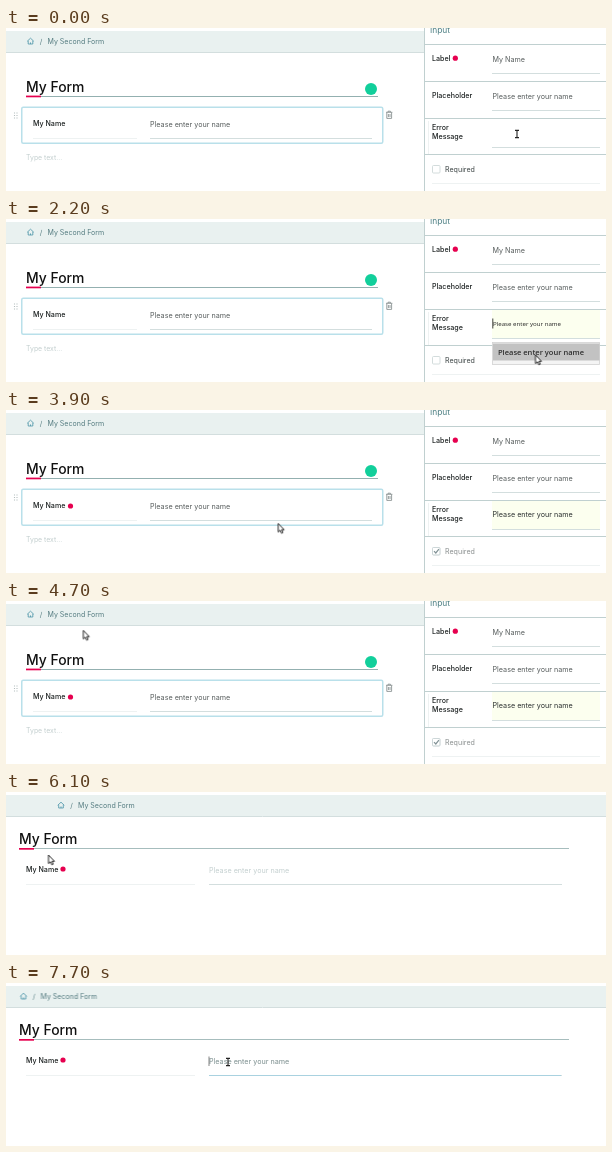
An HTML page for the animation above (8 s loop, 600x163 px).

```html
<!DOCTYPE html>
<html lang="en">
<head>
<meta charset="utf-8">
<title>Form builder</title>
<style>
html, body { margin: 0; width: 100%; height: 100%; overflow: hidden; background: #fff; }
svg { display: block; width: 100vw; height: 100vh; }
text { font: 7.2px Inter, "Open Sans", sans-serif; fill: #565c5c; }
.b { font-weight: 550; font-size: 7.1px; fill: #1a1f1f; }
.title { font-weight: 500; font-size: 13.9px; fill: #111; }
.crumb { font-size: 7.05px; fill: #557c80; }
.ghost { fill: #c3cfcf; }
.sys { font-family: "Open Sans", "Noto Sans", sans-serif; }
.pink { fill: #e6004f; }
.rule { stroke: #d3dede; }
.faint { stroke: #eef2f2; }
.split { stroke: #c0d0d0; }
line { stroke-width: 1; }

/* 1.25% is 100 ms */
.t { animation: 8s step-end infinite; }
.builder { animation-name: builder; }
.preview { animation-name: preview; }
.caret-a { animation-name: caretA; }
.drop { animation-name: drop; }
.hover { animation-name: hover; }
.tint { animation-name: tint; }
.value { animation-name: value; }
.caret-b { animation-name: caretB; }
.checked { animation-name: checked; }
.star { animation-name: star; }
.focus { animation-name: focus; }
.beam { animation-name: beam; }
.arrow { animation-name: arrow; }
.hand { animation-name: hand; }
.lock { animation: lock 8s linear infinite; }
.slide { animation: slide 8s linear infinite; }
.cursor { animation: move 8s linear infinite; }

@keyframes builder { 0% { opacity: 1 } 76.25%, 100% { opacity: 0 } }
@keyframes preview { 0% { opacity: 0 } 76.25%, 100% { opacity: 1 } }
@keyframes caretA { 0% { opacity: 0 } 2.5% { opacity: 1 } 31.25%, 100% { opacity: 0 } }
@keyframes drop { 0% { opacity: 0 } 7.5% { opacity: 1 } 31.25%, 100% { opacity: 0 } }
@keyframes hover { 0% { opacity: 0 } 18.75% { opacity: 1 } 31.25%, 100% { opacity: 0 } }
@keyframes tint { 0% { opacity: 0 } 18.75%, 100% { opacity: 1 } }
@keyframes value { 0% { opacity: 0 } 31.25%, 100% { opacity: 1 } }
@keyframes caretB { 0% { opacity: 0 } 31.25% { opacity: 1 } 38.75%, 100% { opacity: 0 } }
@keyframes checked { 0% { opacity: 0 } 38.75%, 100% { opacity: 1 } }
@keyframes star { 0% { opacity: 0 } 46.25%, 100% { opacity: 1 } }
@keyframes focus { 0% { opacity: 0 } 95%, 100% { opacity: 1 } }
@keyframes beam { 0% { opacity: 1 } 12.5% { opacity: 0 } 86.25%, 100% { opacity: 1 } }
@keyframes arrow {
  0% { opacity: 0 } 12.5% { opacity: 1 } 33.75% { opacity: 0 } 46.25% { opacity: 1 }
  62.5% { opacity: 0 } 76.25% { opacity: 1 } 86.25%, 100% { opacity: 0 }
}
@keyframes hand { 0% { opacity: 0 } 33.75% { opacity: 1 } 46.25%, 100% { opacity: 0 } }
@keyframes lock { 0%, 46.25% { opacity: 1 } 48.75%, 68.75% { opacity: .6 } 72.5%, 100% { opacity: 1 } }
@keyframes slide {
  0%, 78.75% { transform: translate(30.5px, 0) }
  83.75%, 100% { transform: translate(-7px, 0) }
}
@keyframes move {
  0%, 12.5% { transform: translate(511px, 106px) }
  18.75% { transform: translate(518px, 125px) }
  23.75%, 31.25% { transform: translate(529.5px, 136px) }
  35%, 45% { transform: translate(444px, 140px) }
  46.25% { transform: translate(436px, 135px) }
  51.25%, 52.5% { transform: translate(110px, 92px) }
  53.75% { transform: translate(92px, 84px) }
  56.25%, 57.5% { transform: translate(78px, 48px) }
  58.75% { transform: translate(77.5px, 29.5px) }
  62.4% { transform: translate(5px, -14px) }
  62.5%, 78.75% { transform: translate(42.5px, 63px) }
  85% { transform: translate(203px, 74px) }
  87.5%, 90% { transform: translate(221px, 79px) }
  91.25%, 100% { transform: translate(222px, 79px) }
}
</style>
</head>
<body>
<svg viewBox="0 0 600 163" xmlns="http://www.w3.org/2000/svg">
  <defs>
    <g id="crumbs">
      <path d="M21.2 13.3 24.5 10.2 27.8 13.3M22.2 12.8V16H26.8V12.8M24.5 16V14.4" fill="none" stroke="#4a93a8" stroke-width=".8"/>
      <text class="crumb" x="33.8" y="16.3">/</text>
      <text class="crumb" x="41.5" y="16.3">My Second Form</text>
    </g>
  </defs>
  <rect width="600" height="163" fill="#fff"/>

  <g class="t builder">
    <rect y="3" width="418" height="21" fill="#e9f1f0"/>
    <line class="rule" x1="0" y1="24.5" x2="418" y2="24.5"/>
    <use href="#crumbs"/>

    <text class="title" x="20" y="64">My Form</text>
    <line x1="20" y1="68.5" x2="372" y2="68.5" stroke="#93b0b0"/>
    <rect class="pink" x="20" y="67.6" width="15" height="1.7"/>
    <circle cx="365" cy="61" r="6" fill="#12cf9b"/>

    <path d="M8.5 84.5v6.5M11 84.5v6.5" stroke="#b4bdbd" stroke-width="1.1" stroke-dasharray="1.1 1.4"/>
    <rect x="15.75" y="79.25" width="361" height="36" rx="1.5" fill="#fff" stroke="#b9e0ea" stroke-width="1.5"/>
    <text class="b" x="27" y="98.4">My Name</text>
    <circle class="pink t star" cx="64.5" cy="96" r="2.6"/>
    <text x="144" y="99.3">Please enter your name</text>
    <line class="faint" x1="27" y1="110.5" x2="131" y2="110.5"/>
    <line class="rule" x1="144" y1="110.5" x2="366" y2="110.5"/>
    <path d="M380 84.3h6.4M382 84.2v-1h2.4v1M380.8 84.6v5.8h4.8v-5.8M382.4 86v3M384 86v3" fill="none" stroke="#7d8686" stroke-width=".8"/>
    <text class="ghost" x="20" y="132.4" style="font-size:6.9px">Type text...</text>

    <rect x="418" width="182" height="163" fill="#fff"/>
    <line class="split" x1="418.5" y1="0" x2="418.5" y2="163"/>
    <text x="424" y="5" style="font-size:8.4px;fill:#4a7d80">Input</text>
    <path class="split" d="M419 16.5H600M419 53.5H600M419 90.5H600M419 126.5H600"/>
    <path class="faint" d="M422.5 93V126M426 155.5H594"/>

    <text class="b" x="426" y="32.8">Label</text>
    <circle class="pink" cx="449.3" cy="30.2" r="2.6"/>
    <text x="486.5" y="33.8">My Name</text>
    <line class="rule" x1="486" y1="45.5" x2="594" y2="45.5"/>

    <text class="b" x="426" y="69.8">Placeholder</text>
    <text x="486.5" y="70.6">Please enter your name</text>
    <line class="rule" x1="486" y1="82.5" x2="594" y2="82.5"/>

    <text class="b" x="426" y="102">Error</text>
    <text class="b" x="426" y="110.6">Message</text>
    <rect class="t tint" x="486" y="91" width="108" height="28" fill="#fcffef"/>
    <line class="rule" x1="486" y1="119.5" x2="594" y2="119.5"/>
    <text class="sys t hover" x="487" y="106.8" style="font-size:6.15px;fill:#222">Please enter your name</text>
    <text class="t value" x="486.5" y="107.2" style="fill:#2b3030">Please enter your name</text>
    <line class="t caret-a" x1="486.8" y1="99.5" x2="486.8" y2="109.5" stroke="#111" style="stroke-width:.8"/>
    <line class="t caret-b" x1="567.5" y1="99.5" x2="567.5" y2="109.5" stroke="#111" style="stroke-width:.8"/>

    <g class="lock">
      <rect x="426.5" y="137.5" width="7.5" height="7.5" rx="1" fill="#fff" stroke="#cfd9d9" stroke-width=".9"/>
      <g class="t checked">
        <rect x="426.5" y="137.5" width="7.5" height="7.5" rx="1" fill="none" stroke="#a9b9bb" stroke-width=".9"/>
        <path d="M428 141.2 429.8 143 432.9 139.2" fill="none" stroke="#2f4a50" stroke-width="1.2"/>
      </g>
      <text x="439" y="143.8" style="font-size:7.1px;fill:#3d4545">Required</text>
    </g>

    <g class="t drop">
      <rect x="486.5" y="123.5" width="107" height="22" fill="#f4f4f4" stroke="#d2d2d2" stroke-width=".8"/>
      <rect class="t hover" x="487" y="124.5" width="106.5" height="17" fill="#c2c2c2"/>
      <text class="sys" x="492" y="135.7" style="font-size:7.5px;font-weight:600;fill:#2e2e2e">Please enter your name</text>
    </g>
  </g>

  <g class="t preview">
    <rect width="600" height="163" fill="#fff"/>
    <rect y="3" width="600" height="21" fill="#e9f1f0"/>
    <line class="rule" x1="0" y1="24.5" x2="600" y2="24.5"/>
    <g class="slide"><use href="#crumbs"/></g>

    <text class="title" x="13" y="52">My Form</text>
    <line x1="13" y1="56.5" x2="563" y2="56.5" stroke="#a6bdbd"/>
    <rect class="pink" x="13" y="56" width="15" height="1.7"/>

    <text class="b" x="20" y="79.6">My Name</text>
    <circle class="pink" cx="57" cy="77" r="2.6"/>
    <line class="faint" x1="20" y1="92.5" x2="189" y2="92.5"/>
    <text class="ghost" x="203" y="80.6">Please enter your name</text>
    <line class="rule" x1="203" y1="92.5" x2="556" y2="92.5"/>
    <g class="t focus">
      <text x="203" y="80.6" style="fill:#94a2a2">Please enter your name</text>
      <line x1="203" y1="92.5" x2="555" y2="92.5" stroke="#a9d2e0"/>
      <line x1="203" y1="73.5" x2="203" y2="83" stroke="#333" style="stroke-width:.6"/>
    </g>
  </g>

  <g class="cursor">
    <path class="t beam" d="M-2-3.6H2M0-3.6V3.6M-2 3.6H2" fill="none" stroke="#222" stroke-width="1.1"/>
    <path class="t arrow" d="M0 0V8.6L2 6.8 3.3 9.8 4.8 9.1 3.5 6.3H6Z" fill="#fff" stroke="#111" stroke-width=".9"/>
    <path class="t hand" d="M-1 .5Q0-.6 1 .5V3.2L4.8 4Q5.4 4.3 5.2 5.2L4.4 8.6H-.6L-3 5.2Q-2.6 4.2-1 5.4Z" fill="#fff" stroke="#111" stroke-width=".9"/>
  </g>
</svg>
</body>
</html>
```
